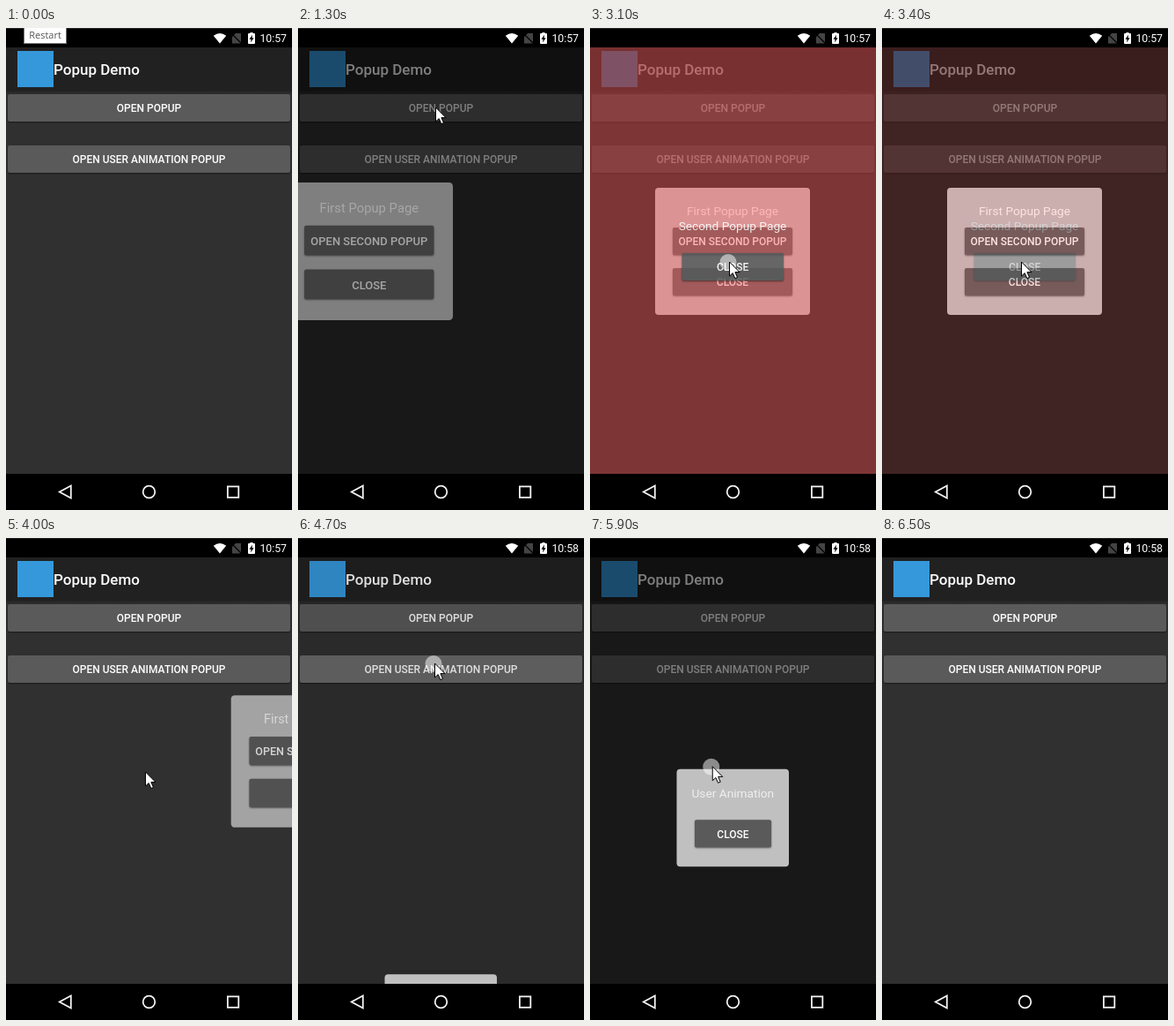
Write an HTML page with a canvas that moves like this. It is 325x546 px and loops after 6800 ms.

```html
<!DOCTYPE html>
<html lang="en">
<head>
<meta charset="utf-8">
<title>Popup Demo</title>
<style>
html, body { margin: 0; width: 100%; height: 100%; overflow: hidden; background: #000; }
canvas { display: block; }
</style>
</head>
<body>
<canvas id="stage" width="325" height="546"></canvas>
<script>
const W = 325, H = 546, LOOP = 6800, STEP = 100;
const TOP = 22, BOTTOM = 505, CX = 162, CY = 253;
const stage = document.getElementById('stage').getContext('2d');
const sheet = document.createElement('canvas');
sheet.width = W;
sheet.height = H;
const layer = sheet.getContext('2d');

const MEDIUM = '500 12px Roboto, sans-serif';
const LABEL = '13.7px Roboto, sans-serif';
const GREY = '#5a5a5a';

// Progress from 0 to 1 between two times, and easings of it.
const span = (t, from, to) => Math.min(1, Math.max(0, (t - from) / (to - from)));
const sinOut = p => Math.sin(p * Math.PI / 2);
const smooth = p => p * p * (3 - 2 * p);

function rect(c, x, y, w, h, color) {
  c.fillStyle = color;
  c.fillRect(x, y, w, h);
}

function round(c, x, y, w, h, r, color) {
  c.fillStyle = color;
  c.beginPath();
  c.roundRect(x, y, w, h, r);
  c.fill();
}

function disc(c, x, y, r) {
  c.beginPath();
  c.arc(x, y, r, 0, Math.PI * 2);
}

function poly(c, points) {
  c.beginPath();
  points.forEach(([x, y]) => c.lineTo(x, y));
  c.closePath();
}

function text(c, str, x, y, font, color = '#fff', align = 'center') {
  c.font = font;
  c.fillStyle = color;
  c.textAlign = align;
  c.fillText(str, x, y);
}

function button(c, str, x, y, w, color = GREY) {
  c.save();
  c.shadowColor = 'rgba(0,0,0,.5)';
  c.shadowBlur = 2;
  c.shadowOffsetY = 1;
  round(c, x, y, w, 31, 2, color);
  c.restore();
  text(c, str, x + w / 2, y + 20.3, MEDIUM);
}

function statusBar(c, clock) {
  rect(c, 0, 0, W, TOP, '#000');
  rect(c, 0, 0, W, 1, '#222');
  c.fillStyle = '#fff';
  c.beginPath();
  c.moveTo(243, 17.5);
  c.lineTo(235.8, 8.8);
  c.quadraticCurveTo(243, 3.2, 250.2, 8.8);
  c.fill();

  c.fillStyle = '#444';
  poly(c, [[261, 6], [267, 6], [267, 17.5], [257, 17.5], [257, 10]]);
  c.fill();
  c.strokeStyle = '#000';
  c.lineWidth = 1.2;
  c.beginPath();
  c.moveTo(256, 6);
  c.lineTo(268, 18);
  c.stroke();

  rect(c, 277.5, 5, 3, 2, '#fff');
  round(c, 275, 6, 8, 12, 1, '#fff');
  c.fillStyle = '#000';
  poly(c, [[280, 7.5], [276.5, 12.7], [278.6, 12.7], [278, 16.5], [281.6, 11.2], [279.5, 11.2]]);
  c.fill();

  text(c, clock, 319, 16, '12.3px Roboto, sans-serif', '#fff', 'right');
}

function navBar(c) {
  rect(c, 0, BOTTOM, W, H - BOTTOM, '#000');
  c.strokeStyle = '#f2f2f2';
  c.lineWidth = 1.8;
  poly(c, [[73.8, 518.5], [73.8, 532.5], [60.8, 525.5]]);
  c.stroke();
  disc(c, 162.5, 525.5, 6.8);
  c.stroke();
  c.strokeRect(251.9, 519.4, 12.4, 12.4);
}

function page(c, pressed) {
  rect(c, 0, TOP, W, BOTTOM - TOP, '#303030');
  rect(c, 0, TOP, W, 49, '#212121');
  const shade = c.createLinearGradient(0, 71, 0, 75);
  shade.addColorStop(0, 'rgba(0,0,0,.25)');
  shade.addColorStop(1, 'rgba(0,0,0,0)');
  rect(c, 0, 71, W, 4, shade);
  rect(c, 13, 26, 41, 41, '#3498db');
  text(c, 'Popup Demo', 54, 53, '500 17px Roboto, sans-serif', '#fff', 'left');
  button(c, 'OPEN POPUP', 2, 75, 321);
  button(c, 'OPEN USER ANIMATION POPUP', 2, 133, 321, pressed ? '#6a6a6a' : GREY);
}

function firstPopup(c) {
  round(c, 74, 181, 176, 144, 4, '#c0c0c0');
  text(c, 'First Popup Page', CX, 212, LABEL);
  button(c, 'OPEN SECOND POPUP', 94, 226, 136);
  button(c, 'CLOSE', 94, 272, 136);
}

function secondPopup(c) {
  rect(c, 0, TOP, W, BOTTOM - TOP, 'rgba(255,91,91,.5)');
  text(c, 'Second Popup Page', CX, 229, LABEL);
  button(c, 'CLOSE', 104.5, 255, 115.5);
}

function userPopup(c) {
  round(c, 98.5, 198, 127.5, 110.5, 4, '#c0c0c0');
  text(c, 'User Animation', CX + .3, 230, LABEL, '#eee');
  button(c, 'CLOSE', 119, 255.5, 87);
}

// Paints a popup as one group, so opacity applies to the whole.
function group(draw, alpha, dx = 0, dy = 0, scale = 1) {
  if (alpha <= 0) return;
  layer.setTransform(1, 0, 0, 1, 0, 0);
  layer.clearRect(0, 0, W, H);
  layer.translate(CX + dx, CY + dy);
  layer.scale(scale, scale);
  layer.translate(-CX, -CY);
  draw(layer);
  stage.globalAlpha = alpha;
  stage.drawImage(sheet, 0, 0);
  stage.globalAlpha = 1;
}

function dim(amount) {
  rect(stage, 0, TOP, W, BOTTOM - TOP, `rgba(0,0,0,${amount * .5})`);
}

// Slides in from the left while shrinking, leaves to the right while growing.
function showFirst(t) {
  if (t < 1000 || t >= 4200) return;
  dim(span(t, 950, 1300) - span(t, 3700, 4000));
  const move = sinOut(span(t, 1032, 1600));
  const shrink = sinOut(span(t, 1100, 1600));
  const leave = span(t, 3700, 4150), fade = leave ** 4;
  group(firstPopup, sinOut(span(t, 1080, 1600)) - fade,
    250 * (move - 1 + smooth(leave)), 0, 1.2 - .2 * (shrink - fade));
}

function showSecond(t) {
  const enter = .12 * span(t, 2000, 2200) + .88 * span(t, 2300, 2700);
  group(secondPopup, enter - span(t, 3030, 3600));
}

// Rises from the bottom edge and drops back.
function showUser(t) {
  if (t < 4700 || t >= 6500) return;
  dim(span(t, 4600, 5000) - span(t, 6100, 6500));
  const rise = span(t, 4650, 5000) ** 3, drop = sinOut(span(t, 5820, 6400));
  group(userPopup, 1, 0, 297 * (1 - rise + drop));
}

// Pointer legs: start, end, target x and y, optional bend.
const legs = [
  [300, 900, 156, 90, -48, 373],
  [1300, 1800, 149, 239],
  [2300, 2700, 158, 265],
  [4000, 4500, 155, 142],
  [5000, 5500, 141, 265],
  [5850, 6400, 44, 0]
];
const taps = [1000, 2100, 3000, 4700, 5700];
const arrow = [[0, 0], [0, 16], [3.7, 12.6], [6.3, 18.6], [9, 17.4], [6.4, 11.6], [11.5, 11.6]];

function pointerAt(t) {
  let x = 25, y = 0;
  for (const [from, to, tx, ty, bx = (x + tx) / 2, by = (y + ty) / 2] of legs) {
    const p = smooth(span(t, from, to)), q = 1 - p;
    x = q * q * x + 2 * p * q * bx + p * p * tx;
    y = q * q * y + 2 * p * q * by + p * p * ty;
    if (t < to) break;
  }
  return [x, y];
}

function pointer(t) {
  if (t < 300 || t >= 6500) return;
  const [x, y] = pointerAt(t);
  if (taps.some(at => t >= at && t < at + 250)) {
    stage.fillStyle = 'rgba(255,255,255,.5)';
    disc(stage, x - 1, y + .5, 9.5);
    stage.fill();
  }
  stage.save();
  stage.translate(x + .5, y);
  poly(stage, arrow);
  stage.fillStyle = '#fff';
  stage.fill();
  stage.strokeStyle = '#000';
  stage.lineWidth = 1;
  stage.stroke();
  stage.restore();
}

function tooltip() {
  rect(stage, 20, 0, 49, 18, '#767676');
  rect(stage, 21, 0, 47, 17, '#fff');
  text(stage, 'Restart', 44.5, 12, '11px "Open Sans", sans-serif', '#575757');
}

function draw(t) {
  page(stage, t >= 4700 && t < 5300);
  showFirst(t);
  showSecond(t);
  showUser(t);
  statusBar(stage, t >= 4400 ? '10:58' : '10:57');
  navBar(stage);
  pointer(t);
  if (t < 300) tooltip();
}

const begin = performance.now();
function tick() {
  const t = Math.max(0, performance.now() - begin) % LOOP;
  draw(Math.floor(t / STEP) * STEP);
  requestAnimationFrame(tick);
}
tick();
</script>
</body>
</html>
```
